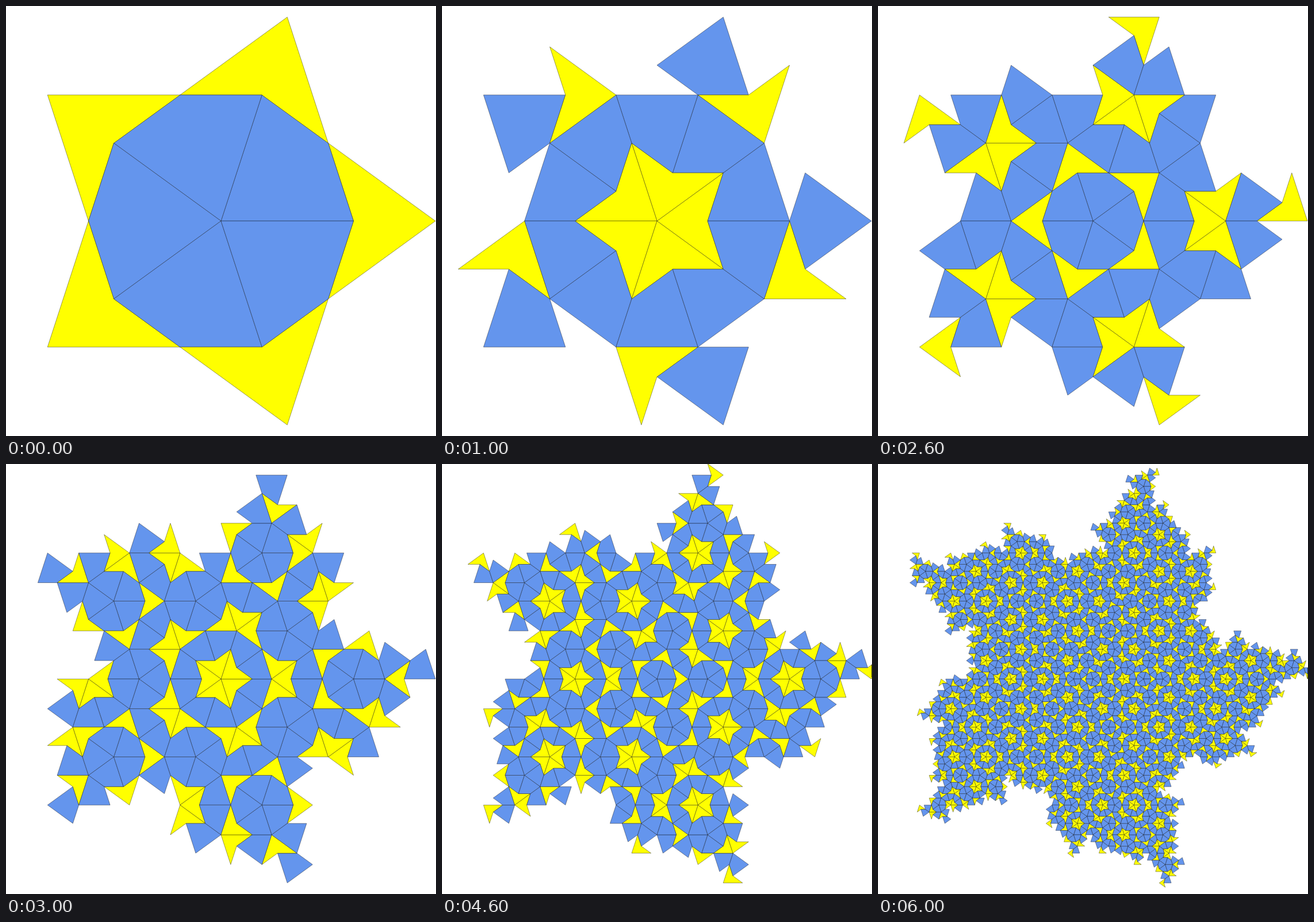
These frames come from a looping animation (748 px wide and 748 px high, 7000 ms). An HTML page with a canvas:

```html
<!DOCTYPE html>
<html lang="en">
<head>
<meta charset="utf-8">
<title>Kite and dart tiling</title>
<style>
  html, body { margin: 0; width: 100%; height: 100%; overflow: hidden; background: #fff; }
  canvas { display: block; width: 748px; height: 748px; }
</style>
</head>
<body>
<canvas id="stage" width="748" height="748"></canvas>
<script>
const SIZE = 748;
const CENTER = SIZE / 2;
const RADIUS = 373;
const PHI = (1 + Math.sqrt(5)) / 2;
const T = Math.PI / 5;
const STEP_MS = 1000;
const GENERATIONS = 7;
const FILL = { kite: 'cornflowerblue', dart: 'yellow' };

const ctx = document.getElementById('stage').getContext('2d');

const polar = (x, y, angle, r) => [x + r * Math.cos(angle), y - r * Math.sin(angle)];

// A tile grows from its tip along its axis; length is its long edge.
const tile = (type, [x, y], axis, length) => ({ type, x, y, axis, length });

function seed() {
  const tiles = [];
  const length = RADIUS / PHI;
  for (let i = 0; i < 5; i++) {
    const angle = 2 * T * i;
    tiles.push(tile('dart', polar(CENTER, CENTER, angle, RADIUS), angle + 5 * T, length));
    tiles.push(tile('kite', [CENTER, CENTER], angle + T, length));
  }
  return tiles;
}

function deflate({ type, x, y, axis, length }) {
  const next = length / PHI;
  const left = polar(x, y, axis + T, length);
  if (type === 'dart') {
    return [
      tile('kite', [x, y], axis, next),
      tile('dart', left, axis + 6 * T, next)
    ];
  }
  const right = polar(x, y, axis - T, length);
  return [
    tile('dart', [x, y], axis - T, next),
    tile('kite', right, axis + 3 * T, next),
    tile('kite', left, axis - 3 * T, next)
  ];
}

function corners({ type, x, y, axis, length }) {
  const middle = type === 'kite' ? length : length / PHI;
  return [
    [x, y],
    polar(x, y, axis - T, length),
    polar(x, y, axis, middle),
    polar(x, y, axis + T, length)
  ];
}

// Outline the cut where a tile runs past the right side of the stage.
function drawCut(points) {
  const cuts = [];
  points.forEach(([x, y], i) => {
    const [x2, y2] = points[(i + 1) % points.length];
    if ((x > SIZE) !== (x2 > SIZE)) cuts.push(y + (y2 - y) * (SIZE - x) / (x2 - x));
  });
  if (cuts.length < 2) return;
  const top = Math.min(...cuts);
  ctx.fillStyle = 'rgba(0, 0, 0, 0.7)';
  ctx.fillRect(SIZE - 1, top, 1, Math.max(...cuts) - top);
}

function drawTile(t) {
  const points = corners(t);
  ctx.beginPath();
  points.forEach(([x, y]) => ctx.lineTo(x, y));
  ctx.closePath();
  ctx.fillStyle = FILL[t.type];
  ctx.fill();
  ctx.stroke();
  drawCut(points);
}

function drawTiling(tiles) {
  ctx.fillStyle = '#fff';
  ctx.fillRect(0, 0, SIZE, SIZE);
  ctx.strokeStyle = '#000';
  ctx.lineWidth = 0.4;
  tiles.forEach(drawTile);
}

const tilings = [seed()];
while (tilings.length < GENERATIONS) {
  tilings.push(tilings[tilings.length - 1].flatMap(deflate));
}

let shown = -1;
function render(now) {
  const generation = Math.floor(now / STEP_MS) % GENERATIONS;
  if (generation !== shown) {
    shown = generation;
    drawTiling(tilings[generation]);
  }
  requestAnimationFrame(render);
}
render(performance.now());
</script>
</body>
</html>
```
